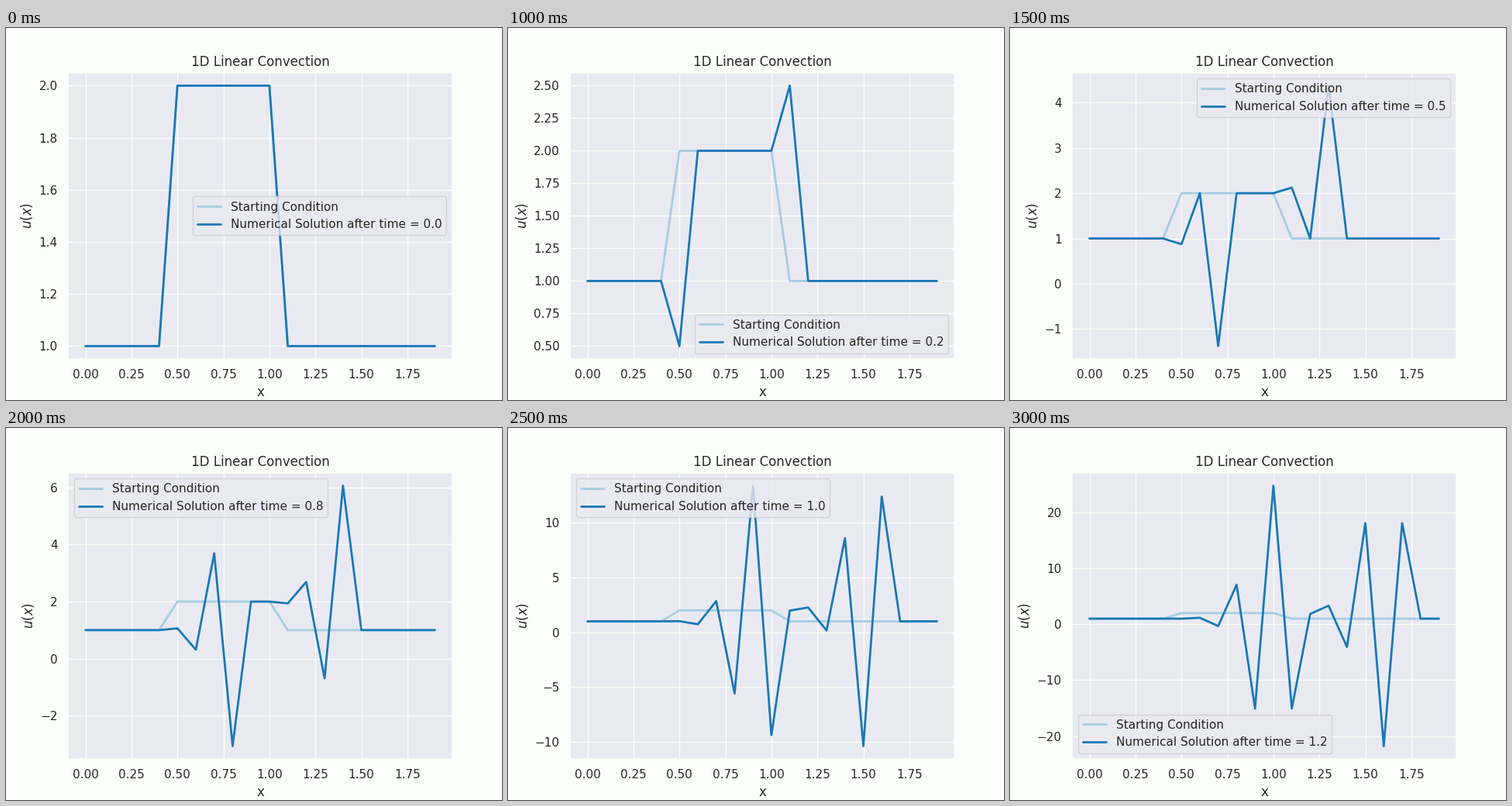
Write a matplotlib script that moves like this. It is 640 px wide and 480 px high and loops after 3.5 s.

```python
import matplotlib.pyplot as plt
import numpy as np
from matplotlib.animation import FuncAnimation

PAPER = "#fbfefa"
PANEL = "#e9e9f2"
INK = "#262626"
LIGHT, DARK = "#a6cee3", "#1978b4"

plt.rcParams.update({
    "font.family": "DejaVu Sans", "font.size": 12,
    "figure.facecolor": PAPER, "axes.facecolor": PANEL,
    "axes.edgecolor": PAPER, "axes.linewidth": 1.25,
    "axes.labelcolor": INK, "axes.titlesize": 12, "axes.labelsize": 12,
    "axes.grid": True, "axes.axisbelow": True,
    "grid.color": PAPER, "grid.linewidth": 1, "text.color": INK,
    "lines.linewidth": 2, "lines.solid_capstyle": "round",
    "legend.fontsize": 11,
})
for side in ("xtick", "ytick"):
    plt.rcParams.update({
        f"{side}.color": INK, f"{side}.labelsize": 11,
        f"{side}.major.size": 6, f"{side}.major.width": 1.25,
    })
plt.rcParams.update({"xtick.bottom": False, "ytick.left": False})

DX = 0.1
COURANT = 1.5
STEPS_PER_UNIT = 6
TIMES = [0, 0, 0.25, 0.5, 0.75, 1.0, 1.25]   # the start is held twice

x = np.arange(20) * DX
start = np.ones(20)
start[5:11] = 2


def solve(time):
    """First-order upwind scheme, unstable at this Courant number."""
    u = start.copy()
    for _ in range(int(time * STEPS_PER_UNIT)):
        u[1:] -= COURANT * np.diff(u)
    return u


fig, ax = plt.subplots(figsize=(6.4, 4.8), dpi=100)


def draw(i):
    time = TIMES[i]
    ax.clear()
    ax.plot(x, start, color=LIGHT, label="Starting Condition")
    ax.plot(x, solve(time), color=DARK,
            label=f"Numerical Solution after time = {time:.1f}")
    ax.set_title("1D Linear Convection")
    ax.set_xlabel("x")
    ax.set_ylabel("$u(x)$")
    ax.legend(loc="best")
    return ax.get_children()


anim = FuncAnimation(fig, draw, frames=len(TIMES), init_func=lambda: draw(0),
                     interval=500, repeat=True, repeat_delay=0)
plt.show()
```
